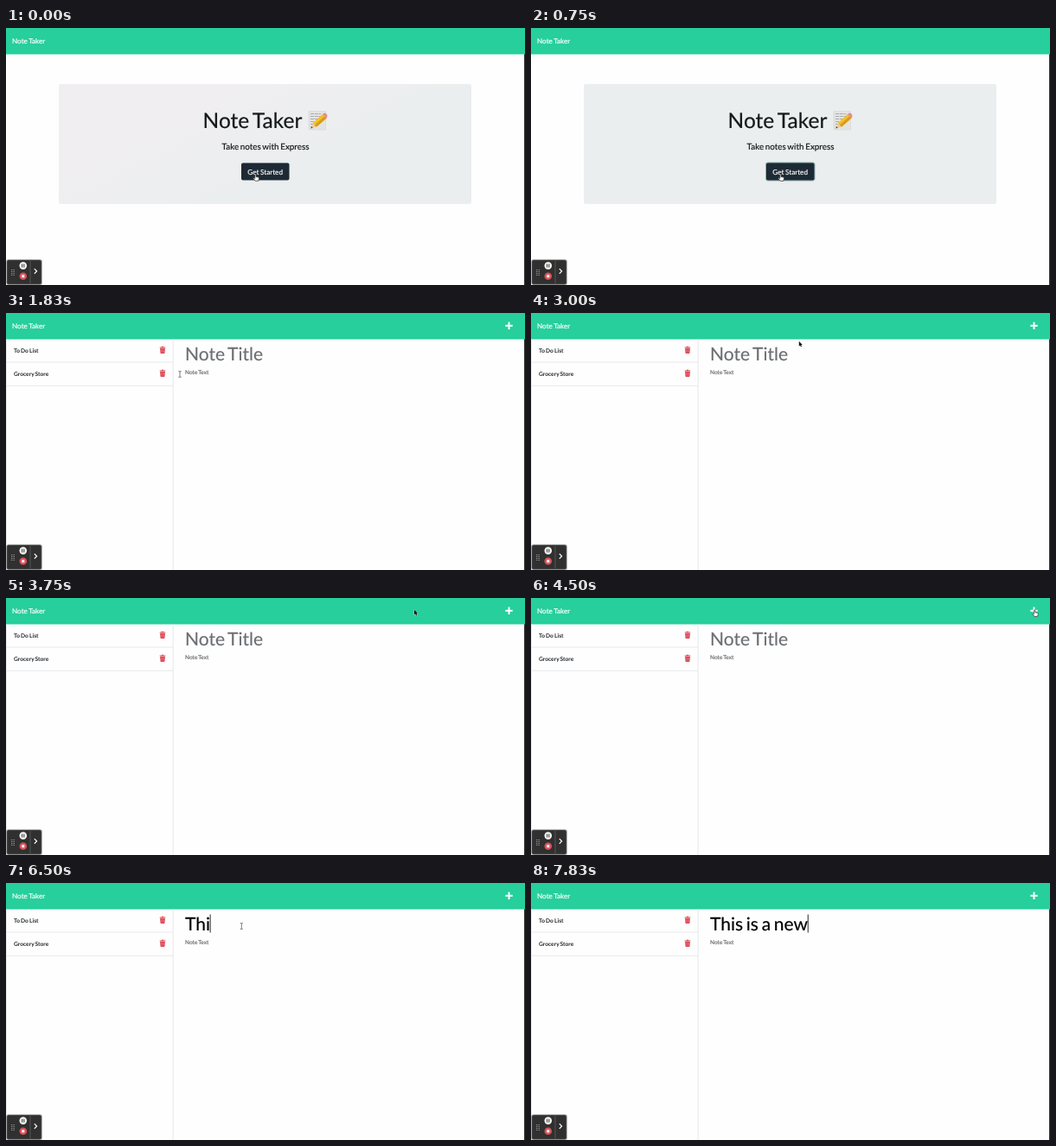
An HTML page that plays this animation: 600 by 298 pixels, repeating every 8000 ms.

```html
<!DOCTYPE html>
<html lang="en">
<head>
<meta charset="utf-8">
<title>Note Taker</title>
<style>
  html, body { margin: 0; width: 100%; height: 100%; overflow: hidden; background: #fefefe; }
  svg { display: block; width: 100vw; height: 100vh; }
  text {
    font: 6.56px Lato, sans-serif; word-spacing: -.078em; white-space: pre;
    text-rendering: geometricPrecision;
    color: #15181b; fill: currentColor; stroke: currentColor; stroke-width: .18px;
  }
  .nav { font-size: 8.2px; color: #fff; }
  .title { font-size: 21px; color: #000; }
  .hint { color: #6c6f72; }
  .item { font-size: 6.65px; font-weight: 700; color: #24282c; stroke-width: 0; }
  .hero { font-size: 24.5px; }
  .lead { font-size: 9.85px; }
  .rule { stroke: #e6e8ea; fill: none; }
</style>
</head>
<body>
<svg viewBox="0 0 600 298" preserveAspectRatio="none">
  <defs>
    <linearGradient id="wash" x2="1" y2=".6">
      <stop offset=".3" stop-color="#f0eef0"/>
      <stop offset=".8" stop-color="#eaeeef"/>
    </linearGradient>
    <g id="trash" fill="#dc4450">
      <path d="M-3.3-3.5h1.9l.5-.7h1.8l.5.7h1.9v.9h-6.6z"/>
      <path d="M-2.9-2.1h5.8l-.4 5.4q0 .7-.7.7h-3.6q-.7 0-.7-.7z"/>
      <path d="M-1.3-1v3.8M0-1v3.8M1.3-1v3.8" stroke="#eda0a5" stroke-width=".4"/>
    </g>
  </defs>

  <rect width="600" height="298" fill="#fefefe"/>
  <rect x="599" y="30" width="1" height="268" fill="#2c2c2c"/>
  <rect width="600" height="30.5" fill="#26cf9b"/>
  <text class="nav" x="7" y="18">Note Taker</text>

  <g id="landing">
    <rect id="panel" x="61" y="65" width="477" height="139" rx="2"/>
    <text class="hero" x="227.6" y="115.5">Note Taker</text>
    <g>
      <path d="M350 96.5h19.5v21.5H350z" fill="#e3e4e2" stroke="#cfd0ce" stroke-width=".5"/>
      <path d="M352 99.5h12M352 102.5h12M352 105.5h9M352 108.5h6M352 111.5h3M352 114.5h5" stroke="#9b9ea0" stroke-width=".8" stroke-dasharray="4 .8"/>
      <path d="M365.8 100l4.8 4.4-11.7 10.4-4.6-4.2z" fill="#f3c12d"/>
      <path d="M368.1 102.2l2.5 2.2-11.7 10.4-2.2-2z" fill="#dc9a1e"/>
      <path d="M354.3 110.6l4.6 4.2-6.4 1.7z" fill="#e9cda0"/>
      <path d="M353.2 114.3l1.4 1.5-2.1.7z" fill="#333"/>
      <path d="M365.8 100l1.6-1.1q1.3-.8 2.9.7 1.9 1.7 1 3.5l-.7 1.3z" fill="#e58a8c"/>
    </g>
    <text class="lead" x="300" y="140.5" text-anchor="middle">Take notes with Express</text>
    <rect id="ring" x="271" y="155.5" width="57.5" height="22" rx="3" fill="#8fb0ab"/>
    <rect x="272" y="156.5" width="55.5" height="20" rx="2" fill="#1d2a35"/>
    <text class="nav" x="299.7" y="169.5" text-anchor="middle">Get Started</text>
  </g>

  <g id="notes">
    <path d="M577.3 14.8h8.4M581.5 10.6v8.4" stroke="#fff" stroke-width="1.9"/>
    <path class="rule" d="M.5 30.5V298M193.2 30.5V298"/>
    <g id="list">
      <path class="rule" d="M0 57H193M0 84.3H193"/>
      <text class="item" x="9" y="46.2">To Do List</text>
      <text class="item" x="9" y="73.3">Grocery Store</text>
      <use href="#trash" x="181" y="43"/>
      <use href="#trash" x="181" y="70"/>
    </g>
    <text id="placeholder" class="title hint" x="207" y="54.5">Note Title</text>
    <text id="typed" class="title" x="207" y="54.5"></text>
    <text class="hint" x="207" y="71">Note Text</text>
    <rect id="caret" y="36.5" width=".9" height="21" fill="#111"/>
  </g>

  <g id="recorder">
    <rect x=".2" y="268.2" width="41.8" height="30" rx="2.5" fill="#000" opacity=".25"/>
    <rect x="1" y="269" width="40" height="28.2" rx="2" fill="#303030" stroke="#777" stroke-width=".5"/>
    <path d="M6.8 280v7M9.2 280v7" stroke="#bbb" stroke-dasharray="1 1"/>
    <path d="M28 270V296.5" stroke="#666" stroke-width=".7"/>
    <circle cx="19.8" cy="275.6" r="4.3" fill="#f4f4f0"/>
    <path d="M18.7 273.6v4M20.9 273.6v4" stroke="#333"/>
    <circle cx="19.8" cy="287.8" r="4.3" fill="#d9525a"/>
    <rect x="18.3" y="286.3" width="3" height="3" fill="#fff"/>
    <path d="M32.8 279.1l2.8 2.9-2.8 2.9" fill="none" stroke="#fff" stroke-width="1.2"/>
  </g>

  <g id="pointer">
    <path id="hand" d="M-.7.7Q0-.2.6.7V3.1L3.2 3.7Q4.2 4 4 5L3.4 7.9H-.3L-2.6 5Q-2.6 3.9-1.5 4.5L-.7 5.1Z" fill="#fff" stroke="#333" stroke-width=".75" stroke-linejoin="round"/>
    <path id="arrow" d="M0 0V5.7L1.3 4.6L2.2 6.5L3.2 6L2.4 4.2H4Z" fill="#111" stroke="#fff" stroke-width=".5" paint-order="stroke"/>
    <path id="beam" d="M-1.6-3.6Q0-3.6 0-2.6 0-3.6 1.6-3.6M0-2.8V2.8M-1.6 3.6Q0 3.6 0 2.6 0 3.6 1.6 3.6" fill="none" stroke="#555" stroke-width=".75"/>
  </g>
</svg>
<script>
  const LOOP = 8000, FPS = 12, BLINK = 500;
  const OPEN = 830, LISTED = 920, FOCUS = 5170;
  const phrase = "This is a new";
  const typing = { start: 6250, end: 7830 };

  // Each move eases to a new spot; sag bends it downwards on the way.
  const home = { x: 288.5, y: 169.4 };
  const moves = [
    { start: 1170, end: 1830, x: 201, y: 71, sag: 12 },
    { start: 2000, end: 3000, x: 309.8, y: 32.8, sag: 65 },
    { start: 3000, end: 4330, x: 582.3, y: 13.5, sag: -8 },
    { start: 4580, end: FOCUS, x: 272.3, y: 50, sag: 0 }
  ];

  const ui = Object.fromEntries([...document.querySelectorAll("[id]")].map(el => [el.id, el]));
  const show = (el, on) => el.style.display = on ? "" : "none";
  const clamp = u => Math.min(1, Math.max(0, u));
  const progress = (t, { start, end }) => clamp((t - start) / (end - start));
  const ease = u => u * u * (3 - 2 * u);

  function pointerAt(t) {
    let { x, y } = home;
    for (const move of moves) {
      const k = ease(progress(t, move));
      x += (move.x - x) * k;
      y += (move.y - y) * k + move.sag * Math.sin(Math.PI * k);
    }
    return { x, y };
  }

  function pointerShape(t, { x, y }) {
    const overPlus = x > 574 && y > 8;
    if (t <= moves[0].start || overPlus) return "hand";
    if (y < 36) return "arrow";
    return x < 194 ? "hand" : "beam";
  }

  function render(t) {
    show(ui.landing, t < OPEN);
    show(ui.notes, t >= OPEN);
    show(ui.list, t >= LISTED);
    show(ui.ring, t >= OPEN - 250);
    ui.panel.setAttribute("fill", t < 1000 / FPS ? "url(#wash)" : "#ebeeef");

    const count = Math.ceil(phrase.length * progress(t, typing));
    const blinkOn = Math.floor((t - FOCUS) / BLINK) % 2 === 0;
    ui.typed.textContent = phrase.slice(0, count);
    show(ui.placeholder, !count);
    show(ui.caret, t >= FOCUS && (count || blinkOn));
    ui.caret.setAttribute("x", 206.7 + (count ? ui.typed.getComputedTextLength() : 0));

    const step = Math.floor((t + 4) * FPS / 1000) * 1000 / FPS;
    const spot = pointerAt(step), shape = pointerShape(step, spot);
    for (const name of ["hand", "arrow", "beam"]) show(ui[name], name === shape);
    ui.pointer.setAttribute("transform", `translate(${spot.x} ${spot.y})`);
    show(ui.pointer, count < 4);
  }

  const start = performance.now();
  function tick() {
    render((performance.now() - start) % LOOP);
    requestAnimationFrame(tick);
  }
  tick();
</script>
</body>
</html>
```
